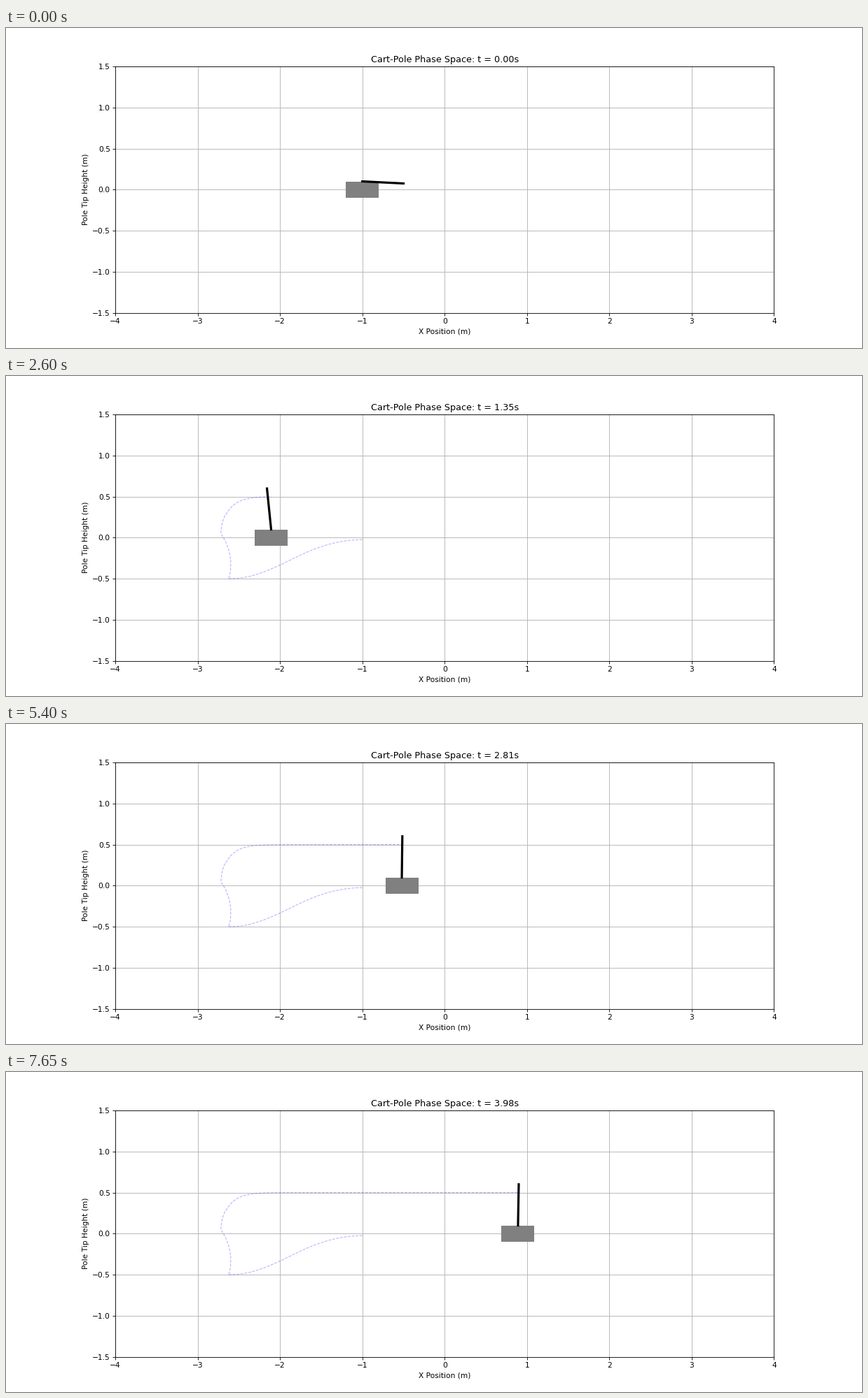
Write a matplotlib script that moves like this. It is 1222 px wide and 458 px high and loops after 7.7 s.

```python
import numpy as np
import matplotlib.pyplot as plt
from matplotlib.animation import FuncAnimation
from matplotlib.patches import Rectangle

WIDTH, HEIGHT, DPI = 1222, 458, 76.375
FRAMES, INTERVAL = 154, 50
DT, SUB = 0.026, 26          # simulated seconds per frame, samples per frame
POLE, CART_W, CART_H = 0.5, 0.4, 0.2
CATCH = 0.806                # from here the pole settles exponentially


def integrate(start, rate):
    """Trapezoid running integral over the time grid."""
    steps = (rate[1:] + rate[:-1]) / 2 * (DT / SUB)
    return start + np.concatenate([[0], np.cumsum(steps)])


def ramps(*points):
    """Straight ramps between (time, rate) key points."""
    return np.interp(time, *zip(*points))


time = np.arange((FRAMES - 1) * SUB + 1) * DT / SUB

# Run left, brake hard, pull left once more, then drift right ever faster.
cart_x = integrate(-1, ramps(
    (0.532, -3.03), (0.547, 0.75), (0.629, 0), (0.715, -2.5), (0.725, 0.3),
    (CATCH, 0.95), (1, 1.03), (1.25, 1.045), (3, 1.14), (3.978, 1.3)))

# Fall, kick from the braking cart, swing up, settle upright.
swing = integrate(1.621, ramps(
    (0, 0), (0.28, 3.55), (0.532, 4.8), (0.55, 9.5), (0.64, 9.2),
    (0.715, 7.6), (CATCH, 3.6)))
tau = np.maximum(time - CATCH, 0)
settle = 2 * np.pi - 1.015 * np.exp(-4.1 * tau) + 0.005 + 0.004 * tau
angle = np.where(time < CATCH, swing, settle)
height = POLE * np.cos(angle)

# The tiny surplus keeps the pixel size from rounding down.
fig, ax = plt.subplots(figsize=((WIDTH + 1e-6) / DPI, (HEIGHT + 1e-6) / DPI), dpi=DPI)
ax.set_xlim(-4, 4)
ax.set_ylim(-1.5, 1.5)
ax.set_aspect("equal")
ax.grid(True)
ax.set_xlabel("X Position (m)")
ax.set_ylabel("Pole Tip Height (m)")
title = ax.set_title("")

trail, = ax.plot([], [], "b--", lw=1, alpha=0.3, zorder=2)
cart = ax.add_patch(Rectangle((0, -CART_H / 2), CART_W, CART_H, fc="gray", zorder=2.1))
pole, = ax.plot([], [], "k-", lw=3, zorder=2.2)


def draw(frame):
    k = frame * SUB
    x, top = cart_x[k], CART_H / 2
    trail.set_data(cart_x[:k + 1], height[:k + 1])
    cart.set_x(x - CART_W / 2)
    pole.set_data([x, x + POLE * np.sin(angle[k])], [top, top + height[k]])
    title.set_text(f"Cart-Pole Phase Space: t = {frame * DT:.2f}s")
    return trail, cart, pole, title


anim = FuncAnimation(fig, draw, frames=FRAMES, interval=INTERVAL,
                     init_func=lambda: draw(0), repeat=True, repeat_delay=0)
plt.show()
```
